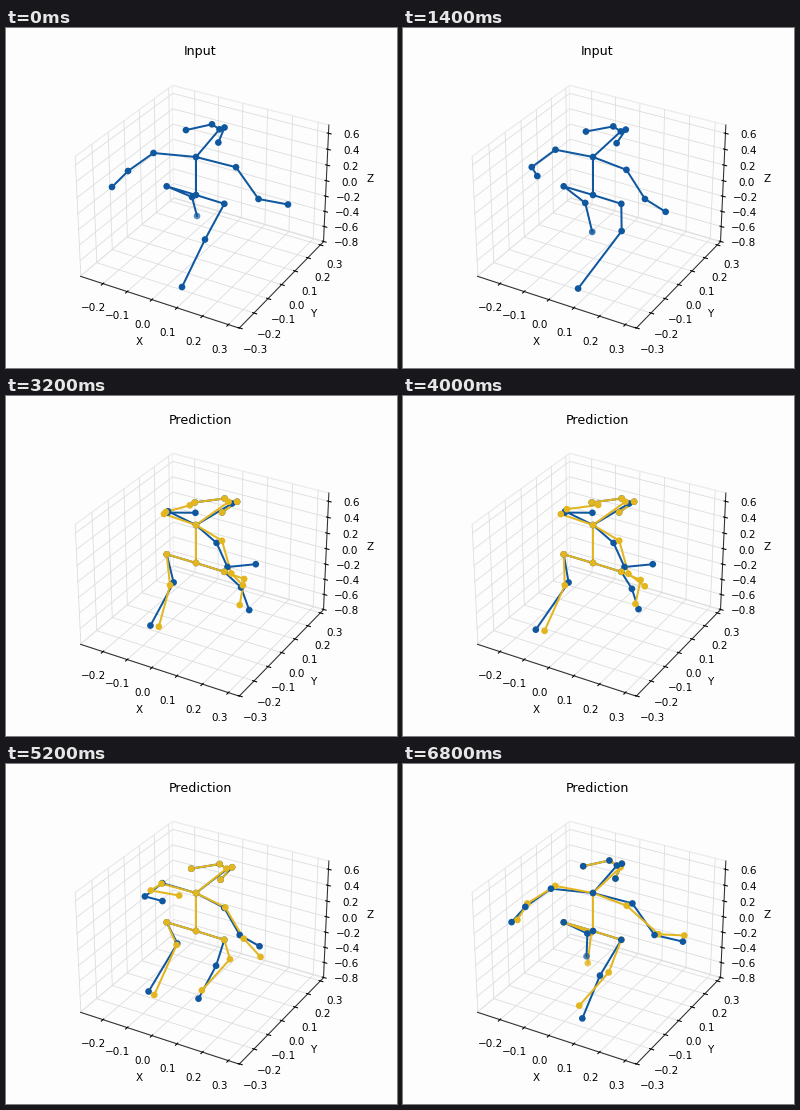
These frames come from a looping animation (391x340 px, 7000 ms). A matplotlib script:

```python
import numpy as np
import matplotlib.pyplot as plt
from matplotlib.animation import FuncAnimation
from matplotlib.colors import to_rgba

W, H, DPI = 391, 340, 96
FRAMES, INTERVAL = 35, 200
STRIDE = 36     # steps in one walking cycle
FORECAST = 10   # first predicted step
CROSSOVER = 29  # the real walker is the nearer one from here on
BACK = "#fdfdfd"
BLUE, GOLD = "#0f579f", "#e3b51e"

CHAINS = [c.split() for c in (
    "r_ear r_eye nose l_eye l_ear",
    "neck nose",
    "r_wrist r_elbow r_shoulder neck l_shoulder l_elbow l_wrist",
    "neck root",
    "r_ankle r_knee r_hip root l_hip l_knee l_ankle",
)]

# Screen positions as x + y*j: centre, then cos, sin, cos 2 and sin 2 sway
TURN = -6.5 - 3.2j
GAIT = {
    "neck": [190 + 129j],
    "root": [190 + 167j],
    "r_hip": [160.7 + 158.3j],
    "l_hip": [218.3 + 175.8j],
    "nose": [220 + 104.5j, TURN],
    "r_eye": [212.5 + 99.5j, TURN],
    "l_eye": [225 + 102.7j, TURN],
    "r_ear": [184.5 + 104.3j, 0.7 * TURN],
    "l_ear": [214.3 + 115.5j, 0.3 * TURN],
    "r_shoulder": [155 + 120j, -7.5 + 5j],
    "r_elbow": [139 + 132j, -21 + 14j, 0, 4 - 3j],
    "r_wrist": [149 + 139j, -43 + 22j, 0, -2j],
    "l_shoulder": [220 + 143.2j, 10 - 4j],
    "l_elbow": [236.5 + 171j, 16],
    "l_wrist": [261 + 177.5j, 16 + 5j, 0, 5 - 6j],
    "r_knee": [176 + 178j, 10 - 9j, 3],
    "r_ankle": [164 + 214j, 27 - 22j, 17 - 6j, -4j],
    "l_knee": [216 + 201.5j, -17 + 10j, 9 - 2j],
    "l_ankle": [199 + 240j, -34 + 24j, 7j, 11 - 5j, -6 + 3j],
}
# The forecast turns its upper body less and misplaces the limbs
STIFF = -0.6
ERROR = {
    **{name: [0, STIFF * GAIT[name][1]]
       for name in ("nose", "r_shoulder", "l_shoulder")},
    "r_elbow": [-2j, 0, -6 + 4j],
    "r_wrist": [-5j, 3j, -17],
    "l_elbow": [4 + 3j, -4j],
    "l_wrist": [-6 + 8j, 5 - 15j, -8],
    "r_knee": [1j, 4 - 2j],
    "r_ankle": [5 + 4j, -4 + 3j],
    "l_knee": [6 - 6j, 3j, -8],
    "l_ankle": [-6.5 - 9j, -4j, -10],
}


def sway(terms, n):
    a = 2 * np.pi * n / STRIDE
    basis = (1, np.cos(a), np.sin(a), np.cos(2 * a), np.sin(2 * a))
    return sum(t * b for t, b in zip(terms, basis))


def walk(n):
    return {name: sway(terms, n) for name, terms in GAIT.items()}


def predict(n):
    s = np.clip((n - FORECAST + 1) / 8, 0, 1)
    grown = s * s * (3 - 2 * s)
    return {name: p + grown * sway(ERROR.get(name, [0]), n)
            for name, p in walk(n).items()}


class Skeleton:
    def __init__(self, ax, motion, color, zorder):
        self.motion, self.color = motion, color
        self.lines = [ax.plot([], [], color=color, lw=1.5, zorder=zorder)[0]
                      for _ in CHAINS]
        self.dots = ax.scatter([], [], s=25, linewidths=0)

    def pose(self, n, visible, level):
        joints = self.motion(n)
        for line, chain in zip(self.lines, CHAINS):
            points = np.array([joints[j] for j in chain])
            line.set_data(points.real, points.imag)
            line.set_visible(visible)
        spots = np.array(list(joints.values()))
        self.dots.set_offsets(np.column_stack([spots.real, spots.imag]))
        # the trailing foot is far away and drawn paler
        far = np.interp(joints["r_ankle"].imag, [185, 225], [0.65, 1])
        self.dots.set_facecolor(
            [to_rgba(self.color, far if j == "r_ankle" else 1)
             for j in joints])
        self.dots.set(visible=visible, zorder=level)


plt.rcParams.update({"font.family": "DejaVu Sans", "font.size": 7.8,
                     "grid.color": "#dcdcdc", "grid.linewidth": 0.6,
                     "axes.linewidth": 0.75})
fig = plt.figure(figsize=(W / DPI, H / DPI), dpi=DPI, facecolor=BACK)

side = 282.5
room = fig.add_axes([53.2 / W, 22 / H, side / W, side / H],
                    projection="3d", facecolor=BACK)
room.set_xticks(np.arange(-2, 4) / 10)
room.set_yticks(np.arange(-3, 4) / 10)
room.set_zticks(np.arange(-4, 4) / 5)
room.set(xlim=(-0.294, 0.3415), ylim=(-0.302, 0.326), zlim=(-0.803, 0.703))
room.set_xlabel("X", labelpad=0.5, fontsize=7.8)
room.set_ylabel("Y", labelpad=-0.2, fontsize=7.8)
room.set_zlabel("Z", labelpad=-0.5, fontsize=7.8)
room.tick_params(labelsize=7.8, pad=2.7)
for axis in (room.xaxis, room.yaxis, room.zaxis):
    axis.pane.set(facecolor=BACK, edgecolor="#ececec", alpha=1)
    axis.line.set_color("#2a2a2a")

stage = fig.add_axes([0, 0, 1, 1], zorder=5)
stage.set(xlim=(0, W), ylim=(H, 0))
stage.axis("off")
title = stage.text(194.5, 27.5, "Input", fontsize=9.5, ha="center")
real = Skeleton(stage, walk, BLUE, 2)
guess = Skeleton(stage, predict, GOLD, 3)


def update(n):
    predicting = n >= FORECAST
    title.set_text("Prediction" if predicting else "Input")
    real.pose(n, True, 6 if n >= CROSSOVER else 4)
    guess.pose(n, predicting, 5)


anim = FuncAnimation(fig, update, frames=FRAMES, interval=INTERVAL)
plt.show()
```
